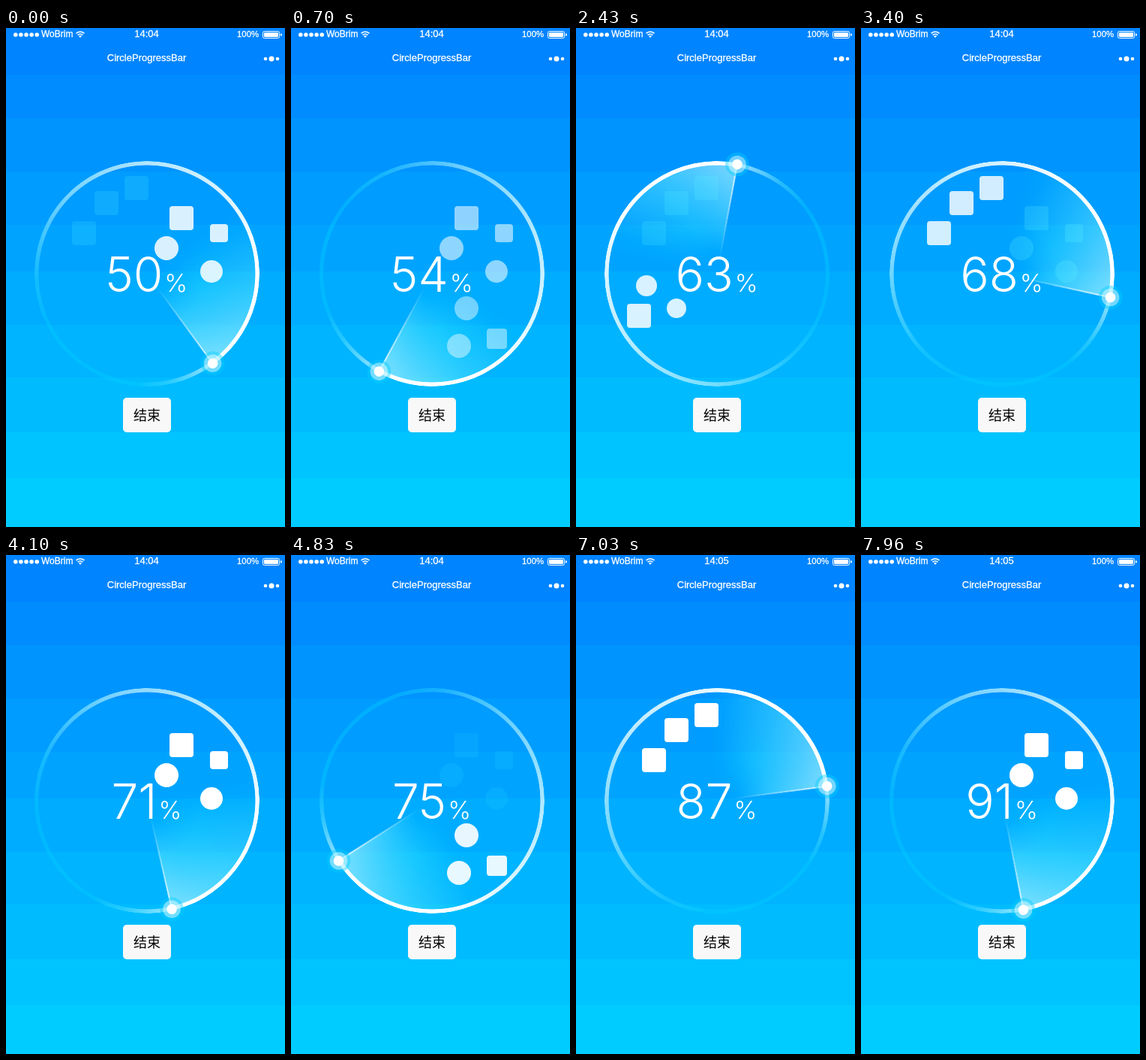
Write an HTML page that moves like this. It is 372x664 px and loops after 8000 ms.

```html
<!DOCTYPE html>
<html lang="zh">
<head>
<meta charset="utf-8">
<title>CircleProgressBar</title>
<style>
  html, body { margin: 0; width: 100%; height: 100%; overflow: hidden; background: #00ccff; }
  #stage { position: relative; width: 372px; height: 664px; overflow: hidden; }
  svg { position: absolute; left: 0; top: 0; }
  text { font-family: "Liberation Sans", Arial, sans-serif; fill: #fff; }
  .caption text { stroke: #fff; stroke-width: .3px; }
  #rotor { position: absolute; left: 38px; top: 177px; width: 300px; height: 300px; }
  #rotor > div { position: absolute; inset: 0; border-radius: 50%; }
  #tint {
    background: conic-gradient(from 90deg, transparent 270deg, rgba(0,225,255,.35) 320deg);
    mask-image: radial-gradient(circle, transparent 15px, #000 75px);
  }
  #wedge {
    background: conic-gradient(from 90deg, transparent 280deg, rgba(255,255,255,.18) 315deg, rgba(255,255,255,.5) 360deg);
    mask-image: radial-gradient(circle, transparent 30px, #000 148px);
  }
  #ring {
    background: conic-gradient(from 90deg, rgba(255,255,255,.6), rgba(255,255,255,.15) 25deg, rgba(255,255,255,0) 42deg 100deg,
      rgba(255,255,255,.08) 125deg, rgba(255,255,255,.45) 170deg, rgba(255,255,255,.7) 217deg, #fff 300deg);
    mask-image: radial-gradient(circle, transparent 144px, #000 144.8px 149.6px, transparent 150.2px);
  }
  #rotor svg { overflow: visible; }
  #number { font-family: Inter, Roboto, sans-serif; font-weight: 350; text-anchor: middle; }
  #label { font: 500 18px "Noto Sans CJK SC", "Noto Sans CJK", sans-serif; fill: #000; text-anchor: middle; }
</style>
</head>
<body>
<div id="stage">
  <svg id="back" width="372" height="664">
    <g id="bands"></g>
    <circle cx="188" cy="327" r="147.5" fill="none" stroke="rgba(0,205,255,.4)" stroke-width="5"/>
  </svg>
  <div id="rotor">
    <div id="tint"></div>
    <div id="wedge"></div>
    <div id="ring"></div>
    <svg width="300" height="300">
      <defs>
        <linearGradient id="beam">
          <stop offset="0" stop-color="#fff" stop-opacity="0"/>
          <stop offset="1" stop-color="#fff" stop-opacity=".85"/>
        </linearGradient>
      </defs>
      <rect x="170" y="149" width="128" height="2" fill="url(#beam)"/>
      <g fill="#fff">
        <circle cx="298" cy="150" r="16" fill="#0cf" opacity=".4"/>
        <circle cx="298" cy="150" r="11.8" opacity=".45"/>
        <circle cx="298" cy="150" r="6.8"/>
      </g>
    </svg>
  </div>
  <svg id="front" width="372" height="664">
    <g id="badges"></g>
    <text id="number" x="187.5" y="350.5" font-size="64"><tspan id="value"></tspan><tspan font-size="33" dx="2">%</tspan></text>

    <g id="signal" fill="#fff"></g>
    <g class="caption">
      <text x="47" y="12" font-size="12">WoBrim</text>
      <text id="clock" x="187.5" y="12" font-size="13" text-anchor="middle"></text>
      <text x="308" y="12" font-size="11.4">100%</text>
      <text x="187.5" y="44" font-size="13" text-anchor="middle">CircleProgressBar</text>
    </g>
    <path d="M93.5 7.2Q99 2.8 104.5 7.2M95.5 9.4Q99 6.6 102.5 9.4" fill="none" stroke="#fff" stroke-width="1.6"/>
    <path d="M96.9 10.8Q99 9.2 101.1 10.8L99 13Z" fill="#fff"/>
    <rect x="342.5" y="4.5" width="22" height="9" rx="2" fill="none" stroke="#fff"/>
    <rect x="344" y="6" width="19" height="6" rx="1" fill="#fff"/>
    <path d="M366 7.2Q368 7.5 368 9T366 10.8Z" fill="#fff"/>
    <g fill="#fff">
      <circle cx="346" cy="41" r="2.3"/><circle cx="354" cy="41" r="3.5"/><circle cx="362" cy="41" r="2.3"/>
    </g>

    <rect x="156" y="492" width="64" height="46" rx="5" fill="#f8f8f8"/>
    <text id="label" x="188" y="521.5">结束</text>
  </svg>
</div>
<script>
  const LOOP = 8000, FRAMES = 139, STEP = LOOP / FRAMES;
  const $ = id => document.getElementById(id);

  function add(parent, tag, attrs) {
    const el = document.createElementNS("http://www.w3.org/2000/svg", tag);
    for (const key in attrs) el.setAttribute(key, attrs[key]);
    return parent.appendChild(el);
  }

  const bandTops = [0, 62, 120, 191, 262, 324, 395, 465, 538, 599];
  bandTops.forEach((y, i) =>
    add($("bands"), "rect", { y, width: 372, height: 664 - y, fill: `rgb(0,${132 + 8 * i},255)` }));

  for (let i = 0; i < 5; i++) add($("signal"), "circle", { cx: 12.8 + 7.1 * i, cy: 9, r: 2.8 });

  // Badge groups in the order they appear: [shape, centre x, centre y, size]
  const groups = [
    [["square", 234, 253, 32], ["square", 284, 273, 24], ["circle", 214, 293, 32], ["circle", 274, 324, 30]],
    [["circle", 234, 373, 32], ["circle", 224, 423, 32], ["square", 274.5, 413.5, 27]],
    [["circle", 94, 343, 28], ["square", 84, 383, 32], ["circle", 134, 373, 26]],
    [["square", 104, 273, 32], ["square", 134, 233, 32], ["square", 174, 213, 32]]
  ].map(badges => {
    const g = add($("badges"), "g", {});
    for (const [shape, cx, cy, size] of badges) {
      const r = size / 2;
      if (shape === "circle") add(g, "circle", { cx, cy, r });
      else add(g, "rect", { x: cx - r, y: cy - r, width: size, height: size, rx: 4 });
    }
    return g;
  });

  // Each quarter turn fades one group in and the previous one out; faint badges look cyan
  function fadeBadges(angle) {
    const phase = (angle + 359) % 360;
    const current = Math.floor(phase / 90);
    const shown = Math.min(1, phase % 90 / 62);
    groups.forEach((g, i) => {
      const opacity = i === current ? shown : i === (current + 3) % 4 ? 1 - shown : 0;
      g.style.opacity = opacity;
      g.style.fill = `rgb(${Math.min(255, 640 * opacity)}, 255, 255)`;
    });
  }

  function draw() {
    const time = performance.now() % LOOP;
    const frame = Math.min(FRAMES - 1, Math.floor((time + 16) / STEP));
    const angle = 53.7 + 5.4 * frame;

    $("rotor").style.transform = `rotate(${angle}deg)`;
    fadeBadges(angle);
    $("value").textContent = Math.round(50 + 0.3 * frame);
    $("clock").textContent = frame < 94 ? "14:04" : "14:05";
    requestAnimationFrame(draw);
  }
  draw();
</script>
</body>
</html>
```
